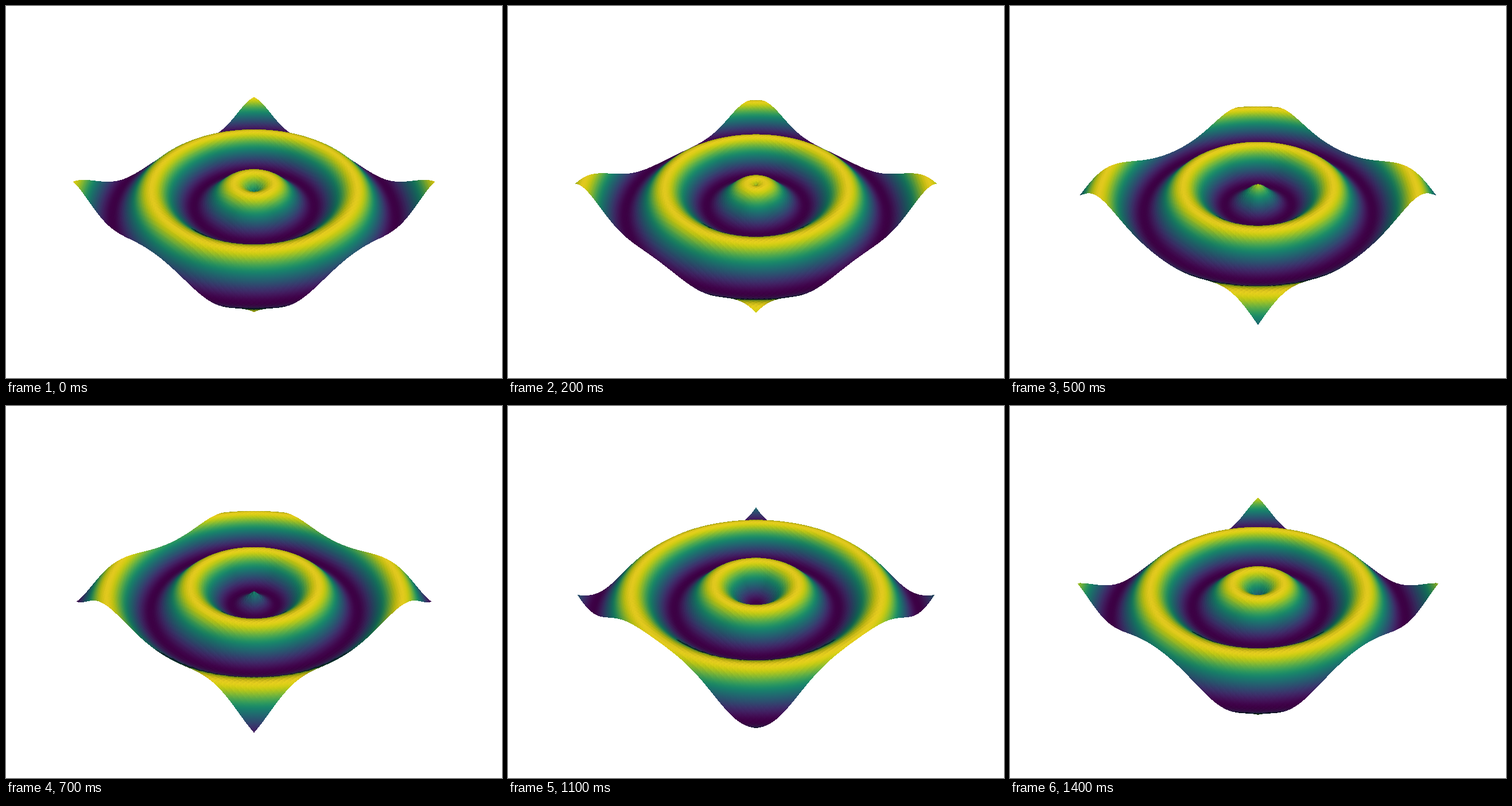
Recreate the animation shown at these times as a matplotlib script. Size 864 px wide and 648 px high, loop 1.5 s.

```python
import numpy as np
import matplotlib.pyplot as plt
from matplotlib.animation import FuncAnimation

W, H = 864, 648
FRAMES, INTERVAL = 15, 100

# Height field z = sin(r + phase) on a regular grid
axis = np.arange(-10, 10, 0.25)
X, Y = np.meshgrid(axis, axis, indexing="ij")
R = np.hypot(X, Y)
MID = (axis[0] + axis[-1]) / 2
HALF = (axis[-1] - axis[0]) / 2

ids = np.arange(R.size).reshape(R.shape)
a, b = ids[:-1, :-1].ravel(), ids[1:, :-1].ravel()
c, d = ids[1:, 1:].ravel(), ids[:-1, 1:].ravel()
TRIS = np.concatenate([np.stack([a, b, c], 1), np.stack([a, c, d], 1)])

# Isometric camera with a 30 degree view angle, fitted to the bounding sphere
RIGHT = np.array([-1, 1, 0]) / np.sqrt(2)
BACK = np.array([1, 1, 1]) / np.sqrt(3)
VIEW = np.stack([RIGHT, np.cross(BACK, RIGHT), BACK])
HALF_ANGLE = np.radians(15)
DIST = np.sqrt(2 * HALF**2 + 1) / np.sin(HALF_ANGLE)
ZOOM = H / 2 / np.tan(HALF_ANGLE)


def direction(elev, azim):
    e, t = np.radians([elev, azim])
    return [np.cos(e) * np.sin(t), np.sin(e), np.cos(e) * np.cos(t)]


# Key, fill, two back lights and a headlight, all fixed to the camera
LIGHT_DIRS = np.array([direction(50, 10), direction(-75, 0),
                       direction(0, 110), direction(0, -110),
                       direction(0, 0)])
LIGHT_RGB = np.array([[1, 0.9725, 0.9021], [0.9086, 0.9334, 1],
                      [1, 1, 1], [1, 1, 1], [1, 1, 1]])
LIGHT_RGB *= 0.75 / np.array([[1], [3], [3.5], [3.5], [3]])

cmap = plt.get_cmap("viridis")


def face_light(cam):
    """Light colour on every flat triangle."""
    p = cam[TRIS]
    n = np.cross(p[:, 1] - p[:, 0], p[:, 2] - p[:, 0])
    n /= np.linalg.norm(n, axis=1, keepdims=True)
    n *= np.where(n[:, 2:] < 0, -1, 1)
    return np.clip(n @ LIGHT_DIRS.T, 0, None) @ LIGHT_RGB


def rasterize(px, py):
    """Triangle, row, column and barycentric weights of every fragment."""
    x0 = np.ceil(px.min(1) - 0.5).astype(int)
    y0 = np.ceil(py.min(1) - 0.5).astype(int)
    cols = np.arange(int(np.ptp(px, axis=1).max()) + 1)
    rows = np.arange(int(np.ptp(py, axis=1).max()) + 1)
    gx = x0[:, None, None] + cols[None, None, :] + 0.5
    gy = y0[:, None, None] + rows[None, :, None] + 0.5

    xj, xk = np.roll(px, -1, 1), np.roll(px, -2, 1)
    yj, yk = np.roll(py, -1, 1), np.roll(py, -2, 1)
    const = xj * yk - xk * yj
    area = const.sum(1, keepdims=True)
    ca, cb, cc = (v / area for v in (yj - yk, xk - xj, const))

    weights = []
    for i in range(3):
        fx, fy, f0 = (v[:, i, None, None] for v in (ca, cb, cc))
        weights.append(fx * gx + (fy * gy + f0))
    inside = (weights[0] >= 0) & (weights[1] >= 0) & (weights[2] >= 0)
    t, row, col = np.nonzero(inside)
    bary = np.stack([w[inside] for w in weights], 1)
    return t, y0[t] + row, x0[t] + col, bary


def render(k):
    z = np.sin(R + 2 * np.pi * k / FRAMES)
    cam = np.stack([X - MID, Y - MID, z], -1).reshape(-1, 3) @ VIEW.T
    depth = DIST - cam[:, 2]
    sx = W / 2 + ZOOM * cam[:, 0] / depth
    sy = H / 2 - ZOOM * cam[:, 1] / depth

    t, row, col, bary = rasterize(sx[TRIS], sy[TRIS])
    inv = bary / depth[TRIS[t]]
    far = 1 / inv.sum(1)
    height = (inv * z.ravel()[TRIS[t]]).sum(1) * far
    rgb = cmap((height + 1) / 2)[:, :3] * face_light(cam)[t]
    rgb = np.round(255 * np.clip(rgb, 0, 1)).astype(np.uint8)

    # Paint from far to near so the closest fragment stays
    order = np.argsort(-far)
    image = np.full((H, W, 3), 255, np.uint8)
    image[row[order], col[order]] = rgb[order]
    return image


fig = plt.figure(figsize=(12, 9), dpi=72, facecolor="white")
ax = fig.add_axes([0, 0, 1, 1])
ax.axis("off")
surface = ax.imshow(render(0), aspect="auto", interpolation="nearest")


def update(k):
    surface.set_data(render(k))
    return [surface]


anim = FuncAnimation(fig, update, frames=FRAMES, interval=INTERVAL,
                     repeat=True, repeat_delay=0)
plt.show()
```
